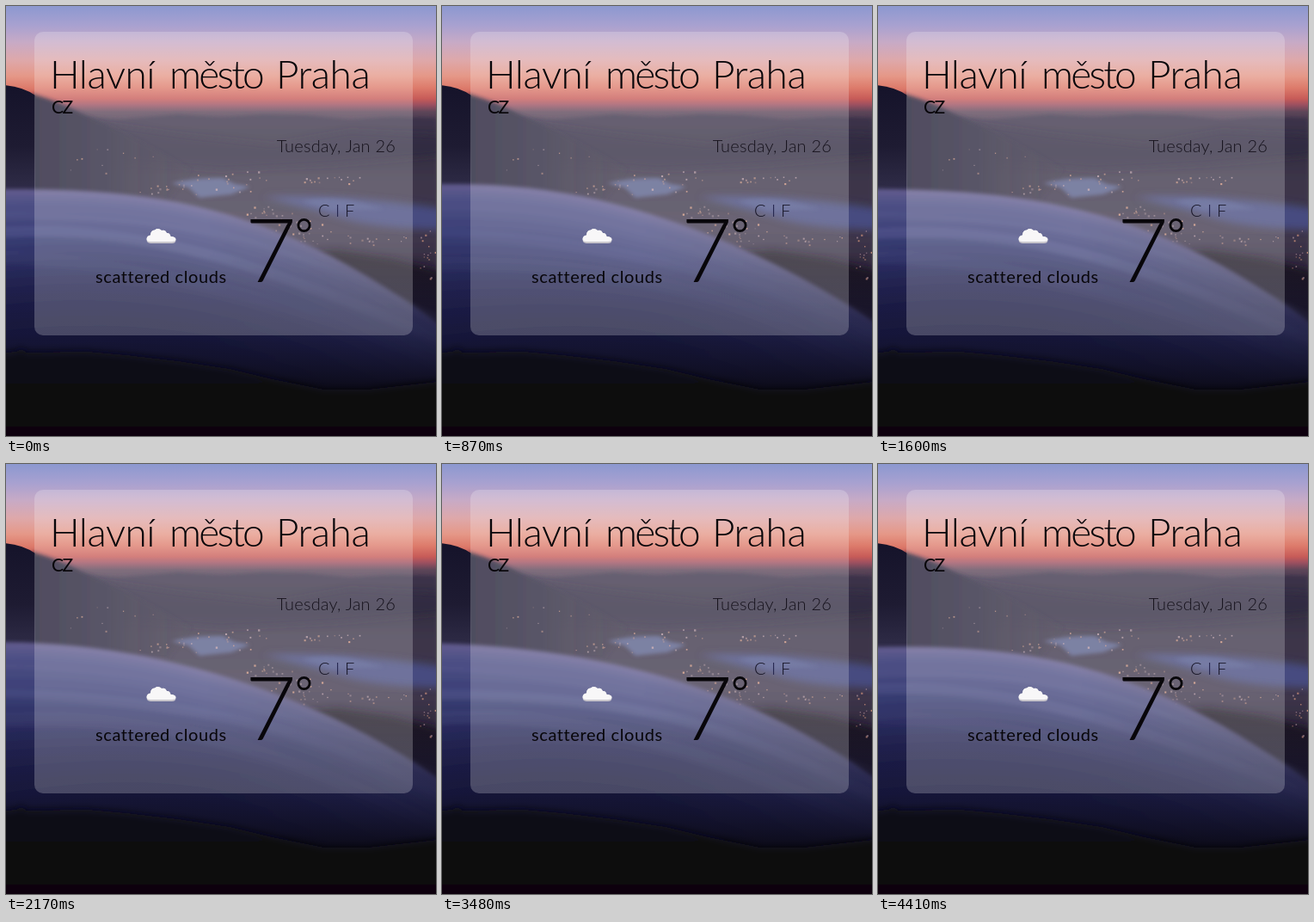
Recreate the animation shown at these times as an HTML page. Size 500 px wide and 500 px high, loop 4.51 s.

```html
<!DOCTYPE html>
<html lang="en">
<head>
<meta charset="utf-8">
<title>Weather card</title>
<style>
  html, body { margin: 0; width: 100%; height: 100%; overflow: hidden; background: #0b080f; }
  svg { display: block; width: 100vw; height: 100vh; }
  text { font-family: Lato, "Open Sans", sans-serif; font-weight: 300; fill: #08060a; }
</style>
</head>
<body>
<svg viewBox="0 0 500 500">
  <defs>
    <linearGradient id="sky" x1="0" y1="0" x2="0" y2="140" gradientUnits="userSpaceOnUse">
      <stop offset="0" stop-color="#8c98d0"/>
      <stop offset=".16" stop-color="#a8a1d0"/>
      <stop offset=".3" stop-color="#c7aac6"/>
      <stop offset=".45" stop-color="#dea8aa"/>
      <stop offset=".58" stop-color="#e59888"/>
      <stop offset=".68" stop-color="#dd7b6b"/>
      <stop offset=".77" stop-color="#c75b58"/>
      <stop offset=".82" stop-color="#9c5060"/>
      <stop offset=".88" stop-color="#5c4558"/>
      <stop offset="1" stop-color="#463a50"/>
    </linearGradient>
    <linearGradient id="land" x1="0" y1="125" x2="0" y2="350" gradientUnits="userSpaceOnUse">
      <stop offset="0" stop-color="#3c344a"/>
      <stop offset=".2" stop-color="#363042"/>
      <stop offset=".38" stop-color="#3d364a"/>
      <stop offset=".6" stop-color="#40384e"/>
      <stop offset="1" stop-color="#251d2d"/>
    </linearGradient>
    <linearGradient id="peak" x1="0" y1="92" x2="0" y2="210" gradientUnits="userSpaceOnUse">
      <stop offset="0" stop-color="#15132a"/>
      <stop offset=".6" stop-color="#1e1b32"/>
      <stop offset="1" stop-color="#2e2b46"/>
    </linearGradient>
    <linearGradient id="slope" x1="30" y1="0" x2="220" y2="0" gradientUnits="userSpaceOnUse">
      <stop offset="0" stop-color="#1e1b32"/>
      <stop offset=".45" stop-color="#2c273d"/>
      <stop offset="1" stop-color="#363042" stop-opacity=".3"/>
    </linearGradient>
    <linearGradient id="far" x1="230" y1="0" x2="500" y2="0" gradientUnits="userSpaceOnUse">
      <stop offset="0" stop-color="#262543" stop-opacity="0"/>
      <stop offset="1" stop-color="#262543" stop-opacity=".6"/>
    </linearGradient>
    <linearGradient id="dusk" x1="0" y1="290" x2="0" y2="440" gradientUnits="userSpaceOnUse">
      <stop offset="0" stop-color="#14143a" stop-opacity="0"/>
      <stop offset=".6" stop-color="#151538" stop-opacity=".5"/>
      <stop offset="1" stop-color="#0d0c1c" stop-opacity=".95"/>
    </linearGradient>
    <linearGradient id="ground" x1="0" y1="400" x2="0" y2="500" gradientUnits="userSpaceOnUse">
      <stop offset="0" stop-color="#0f0c16"/>
      <stop offset="1" stop-color="#08060b"/>
    </linearGradient>
    <filter id="soft2" x="-10%" y="-20%" width="120%" height="140%"><feGaussianBlur stdDeviation="2"/></filter>
    <filter id="soft4" filterUnits="userSpaceOnUse" x="-30" y="80" width="560" height="450"><feGaussianBlur stdDeviation="4"/></filter>
    <filter id="mist" filterUnits="userSpaceOnUse" x="-30" y="180" width="560" height="350"><feGaussianBlur stdDeviation="2"/></filter>
  </defs>

  <rect width="500" height="500" fill="url(#sky)"/>
  <path d="M0 130L60 127 130 132 200 126 250 129 300 126 350 127 400 132 450 129 500 130V400H0Z" fill="url(#land)" filter="url(#soft2)"/>
  <g filter="url(#soft4)">
    <path d="M-20 140L90 134 200 150 310 162 400 146 520 152V172L380 184 250 190 150 182-20 200Z" fill="#2f2940" opacity=".6"/>
    <path d="M300 222Q400 218 520 238V260Q430 260 385 245Z" fill="#474c80"/>
    <path d="M335 288L385 284 450 294 520 312V390L440 345 370 305Z" fill="#1b1523"/>
  </g>
  <path d="M30 102Q62 111 90 126Q145 150 215 190L190 225H30Z" fill="url(#slope)" filter="url(#soft2)"/>
  <path d="M-5 92Q18 93 34 104V222H-5Z" fill="url(#peak)"/>
  <path d="M192 206Q222 199 252 200L266 207 284 210 262 219 225 223 212 211Z" fill="#585e8a" filter="url(#soft2)"/>
  <path d="M345 227Q372 221 408 228L440 236 380 238Z" fill="#50568a" filter="url(#soft2)"/>
  <g id="lights"></g>

  <g id="fog" filter="url(#mist)"></g>
  <rect y="290" width="500" height="210" fill="url(#dusk)"/>
  <path d="M-10 404L12 402 18 398 24 403 95 402 140 406 200 413 260 422 310 434 370 446 420 446 510 436V510H-10Z" fill="url(#ground)" filter="url(#soft4)"/>

  <rect x="33" y="30" width="440" height="353" rx="10" fill="#fff" fill-opacity=".22"/>

  <text y="96" font-size="46" letter-spacing="-.5"><tspan x="51">Hlavní</tspan> <tspan x="190" letter-spacing="-2.8">město</tspan> <tspan x="314" letter-spacing="-.5">Praha</tspan></text>
  <text x="53" y="125" font-size="21" letter-spacing="-1.5" style="font-weight:400">CZ</text>
  <text x="453" y="170" font-size="20" letter-spacing=".2" text-anchor="end" style="fill:#17131d">Tuesday, Jan 26</text>
  <text y="245" font-size="20" style="fill:#171526"><tspan x="363">C</tspan> <tspan x="383" fill="#20224a">I</tspan> <tspan x="394">F</tspan></text>
  <text x="278" y="321" font-size="103">7</text>
  <circle cx="346.5" cy="255" r="6.6" fill="none" stroke="#08060a" stroke-width="2.8"/>
  <text x="104" y="322" font-size="20" letter-spacing=".6" style="font-weight:400">scattered clouds</text>

  <path d="M168 276Q163.500 275.500 163.500 271.500Q164 267 168 266.500Q168 261 173 260.500Q177 257.500 181 261Q185 259.500 187 264Q190.500 263.500 191.500 268Q197.500 268 197.500 272.500Q197 276 193 276Z" fill="#c9c6cc"/>
  <path d="M168 274Q163.500 274 163.500 270.500Q164 267 168 266.500Q168 261 173 260.500Q177 257.500 181 261Q185 259.500 187 264Q190.500 263.500 191.500 268Q197.500 268 197.500 271.500Q197 274 193 274Z" fill="#f8f7f8"/>
</svg>
<script>
const LOOP = 4510, LAST = 4410;
const NS = "http://www.w3.org/2000/svg";

function add(parent, tag, attrs) {
  const el = document.createElementNS(NS, tag);
  for (const key in attrs) el.setAttribute(key, attrs[key]);
  return parent.appendChild(el);
}

// City lights: clusters as [x, y, half width, half height, count]
let seed = 11;
const rand = () => (seed = seed * 16807 % 2147483647) / 2147483647;
const spread = () => rand() + rand() - 1;
const lights = document.getElementById("lights");
const clusters = [
  [270, 202, 48, 14, 18], [375, 201, 45, 6, 16], [190, 210, 45, 12, 18],
  [345, 263, 50, 18, 28], [295, 240, 40, 10, 16], [430, 272, 50, 10, 14],
  [487, 285, 14, 32, 16], [115, 180, 60, 22, 10]
];
for (const [x, y, w, h, count] of clusters) {
  for (let i = 0; i < count; i++) {
    const size = 1 + rand() * 1.4;
    add(lights, "rect", {
      x: x + spread() * w, y: y + spread() * h, width: size, height: size,
      fill: rand() < 0.6 ? "#d99a80" : "#b99aa2", opacity: 0.3 + rand() * 0.6
    });
  }
}

// Fog: nested layers from the bright crest to the dark base
const stops = [[0, [98, 92, 142]], [14, [78, 80, 134]], [50, [58, 62, 117]],
               [95, [40, 42, 92]], [145, [29, 30, 70]], [200, [19, 19, 48]]];
const fog = document.getElementById("fog");
const layers = [];

function shade(depth) {
  const i = Math.max(1, stops.findIndex(s => s[0] >= depth));
  const [d0, c0] = stops[i - 1], [d1, c1] = stops[i];
  const k = (depth - d0) / (d1 - d0);
  return `rgb(${c0.map((c, n) => Math.round(c + (c1[n] - c) * k))})`;
}

for (let depth = 0; depth <= 200; depth += depth < 20 ? 4 : 10) {
  layers.push({ depth, el: add(fog, "path", { fill: shade(depth) }) });
}
const streaks = [[240, 7, 0.08], [264, 12, 0.18], [296, 16, 0.08]].map(([y, width, alpha], i) => ({
  y, alpha, lag: i * 0.3,
  el: add(fog, "path", { fill: "none", stroke: "#8086b8", "stroke-width": width })
}));
layers.push({ depth: 0, el: add(fog, "path", { fill: "url(#far)" }) });

const swell = (x, phase) => Math.cos(2 * Math.PI * (phase - x / 600));

function curve(fn) {
  let d = "";
  for (let x = -20; x <= 520; x += 20) d += (d ? "L" : "M") + x + " " + fn(x).toFixed(2);
  return d;
}

function crest(x, phase) {
  return 210 + 156 * Math.pow(Math.max(0, x) / 500, 2.25) + 3 * swell(x, phase);
}

function draw(time) {
  const phase = 3 * Math.min(time % LOOP, LAST) / LOOP;
  for (const { depth, el } of layers) {
    const lag = phase - depth / 300;
    el.setAttribute("d", curve(x => crest(x, lag) + depth * (1 - x / 1400)) + "V520H-20Z");
  }
  for (const { y, alpha, lag, el } of streaks) {
    el.setAttribute("d", curve(x => y + x * x * 0.00048 + 4 * swell(x, phase - lag)));
    el.setAttribute("stroke-opacity", alpha * (0.75 + 0.45 * swell(0, phase - lag / 2)));
  }
}

const start = performance.now();
function tick() {
  draw(performance.now() - start);
  requestAnimationFrame(tick);
}
tick();
</script>
</body>
</html>
```
